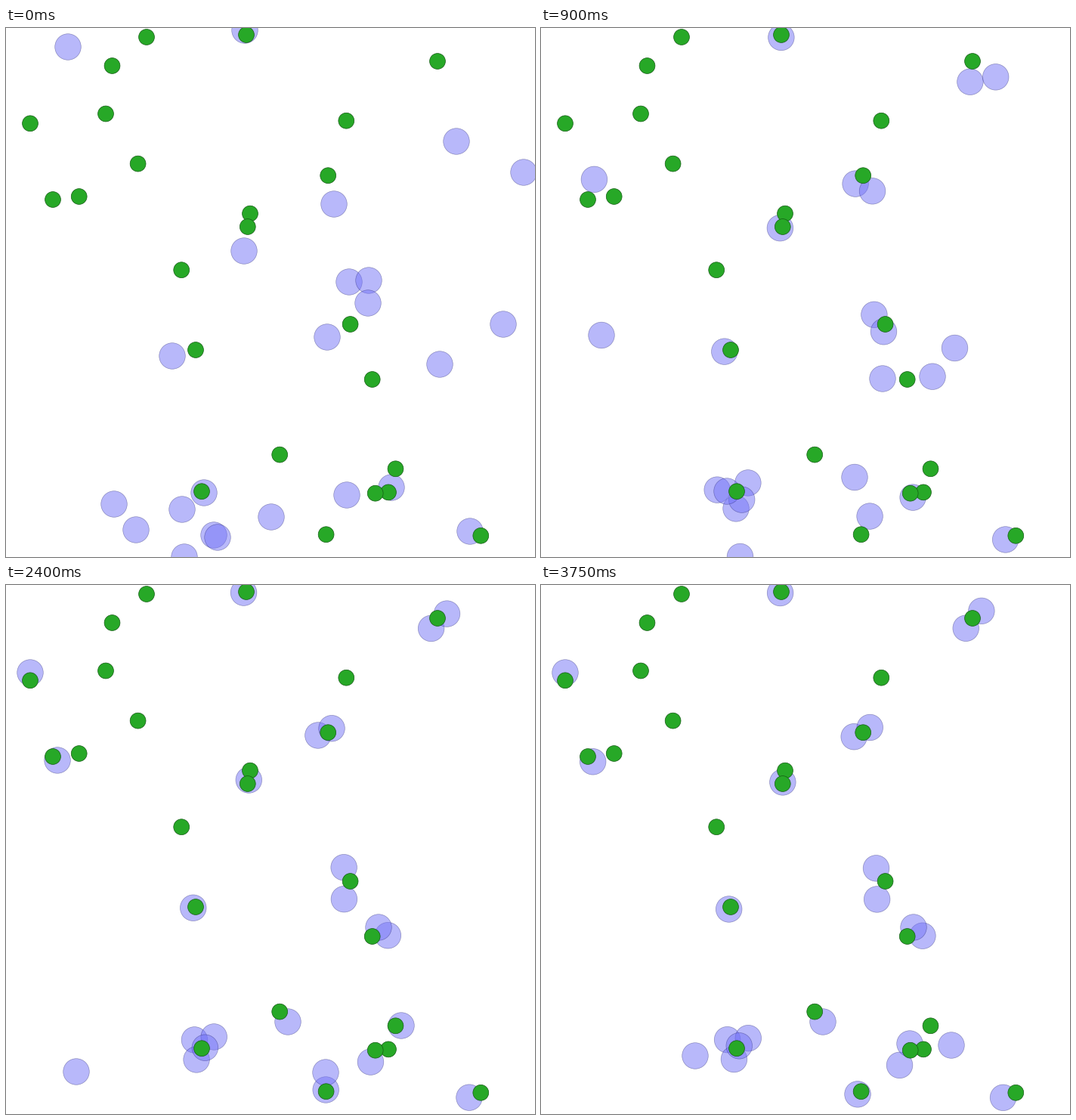
Write a matplotlib script that moves like this. It is 700 px wide and 700 px high and loops after 3.9 s.

```python
import numpy as np
import matplotlib.pyplot as plt
from matplotlib.animation import FuncAnimation
from matplotlib.patches import Circle

SIZE, DPI = 700, 100
FRAMES, STEP = 26, 150
LEG = 4                    # frames a wanderer needs per waypoint
QUICK, SLOW = 0.75, 0.9    # share of the gap left after each frame
WOBBLE = 2.5

BLUE = (115 / 255, 115 / 255, 247 / 255, 0.5)
BLUE_EDGE = (0.1, 0.1, 0.4, 0.4)
GREEN, GREEN_EDGE = "#27a827", "#145a14"

DOTS = [
    (186, 12), (318, 9), (140.5, 50), (571, 44), (32, 126.3), (132, 113.5),
    (450.3, 122.7), (174.6, 179.6), (62, 227), (96.7, 223), (426.2, 195.2),
    (323, 245.6), (319.8, 263), (232.2, 320.2), (455.6, 392), (251, 426),
    (484.7, 465), (362.2, 564.6), (515.5, 583.3), (259, 613.2),
    (506, 614.4), (488.7, 615.7), (423.6, 670.2), (628.3, 671.8),
]

# Start and resting place of discs that settle beside a dot.
SEEKERS = [
    ((82, 25), (70, 236)), ((220, 434), (250, 429)), ((316, 3), (317, 12)),
    ((596, 150), (560, 56)), ((685, 191), (584, 36)),
    ((434, 233), (412, 199)), ((454, 336), (433, 189)),
    ((315, 295), (319, 260)), ((425, 409), (446, 375)),
    ((480, 334), (447, 414)), ((574, 445), (504, 466)),
    ((172, 664), (248, 602)), ((262, 615), (274, 598)),
    ((275, 671), (253, 630)), ((280, 674), (263, 612)),
    ((614, 666), (614, 677)),
]
DRIFTERS = [((510, 608), (474, 636)), ((451, 618), (419, 677))]

# Discs that roam from place to place.
WANDERERS = [
    [(143, 630), (93, 508), (67, 305), (55, 171), (32, 116)],
    [(479, 364), (469, 421), (435, 507), (366, 588), (373, 578)],
    [(658, 392), (528, 434), (567, 413), (493, 453)],
    [(351, 647), (389, 612), (441, 577), (503, 562), (523, 583),
     (526, 605), (543, 609)],
    [(233, 637), (242, 604), (250, 622), (190, 635), (93, 644),
     (182, 634), (204, 623)],
    [(236, 700), (249, 699), (278, 700), (370, 700), (423, 645),
     (445, 632), (488, 607)],
]

PAIRS = np.array(SEEKERS + DRIFTERS, float)
START, HOME = PAIRS[:, 0], PAIRS[:, 1]
KEEP = np.array([QUICK] * len(SEEKERS) + [SLOW] * len(DRIFTERS))[:, None]

rng = np.random.default_rng(4)
PHASE = rng.uniform(0, 2 * np.pi, HOME.shape)
RATE = rng.uniform(0.5, 1.0, HOME.shape)


def settle(frame):
    """Close the gap to the resting place, then hover around it."""
    gap = KEEP ** frame
    hover = WOBBLE * np.sin(RATE * frame + PHASE)
    return HOME + (START - HOME) * gap + hover * (1 - gap)


def wander(path, frame):
    xs, ys = zip(*path)
    steps = range(len(path))
    return np.interp(frame / LEG, steps, xs), np.interp(frame / LEG, steps, ys)


def positions(frame):
    return [*settle(frame), *(wander(path, frame) for path in WANDERERS)]


fig = plt.figure(figsize=(SIZE / DPI, SIZE / DPI), dpi=DPI, facecolor="white")
ax = fig.add_axes([0, 0, 1, 1])
ax.set(xlim=(0, SIZE), ylim=(SIZE, 0))
ax.axis("off")


def add_circle(center, radius, fill, edge, z):
    return ax.add_patch(Circle(center, radius, facecolor=fill, edgecolor=edge,
                               linewidth=0.5, zorder=z))


discs = [add_circle(p, 17.3, BLUE, BLUE_EDGE, 1) for p in positions(0)]
for dot in DOTS:
    add_circle(dot, 10.4, GREEN, GREEN_EDGE, 2)


def update(frame):
    for disc, center in zip(discs, positions(frame)):
        disc.center = center
    return discs


anim = FuncAnimation(fig, update, frames=FRAMES, interval=STEP,
                     repeat=True, repeat_delay=0, blit=False)
plt.show()
```
